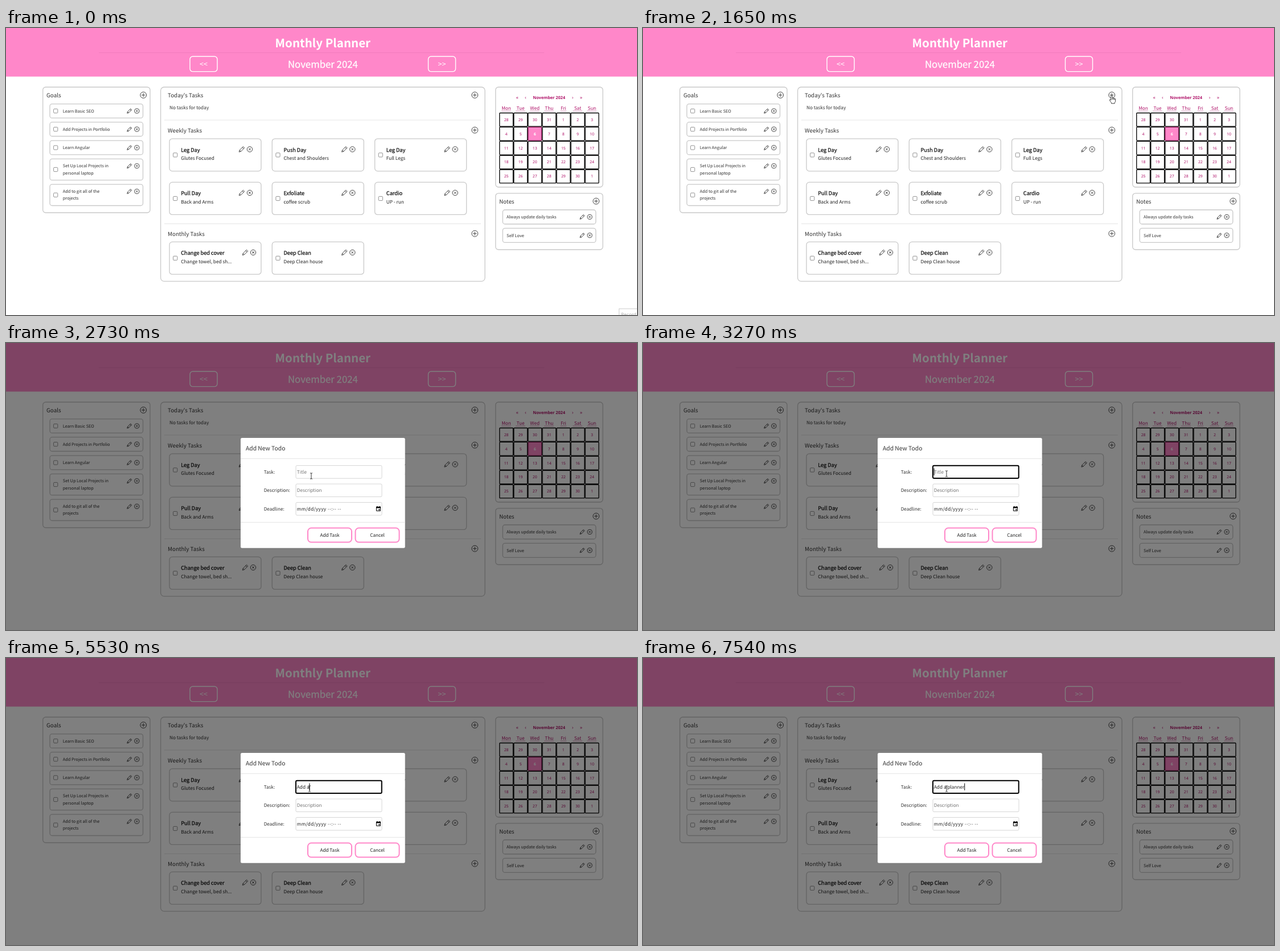
Recreate the animation shown at these times as an HTML page. Size 1108x505 px, loop 8000 ms.

```html
<!DOCTYPE html>
<html lang="en">
<head>
<meta charset="utf-8">
<title>Monthly Planner</title>
<style>
  html, body { margin: 0; width: 100%; height: 100%; overflow: hidden; background: #fff; }
  svg { display: block; width: 1108px; height: 505px; }
  text { font-family: "Noto Sans CJK JP", "Noto Sans CJK SC", "Noto Sans", sans-serif; white-space: pre; text-rendering: geometricPrecision; }
  .cal, .tip { font-family: "Noto Sans", sans-serif; }
</style>
</head>
<body>
<svg id="stage" viewBox="0 0 1108 505"></svg>
<script>
const PINK = '#ff87c9', PLUM = '#b0146a', GREY = '#c9c9c9', LOOP = 8000;

const text = (x, y, size, str, fill = '#333', more = '') =>
  `<text x="${x}" y="${y}" font-size="${size}" fill="${fill}" ${more}>${str}</text>`;
const mid = 'text-anchor="middle"';
const medium = (color, w) => `stroke="${color}" stroke-width="${w}"`;
const box = (x1, y1, x2, y2, r, stroke = GREY, w = 1.3, fill = '#fff') =>
  `<rect x="${x1}" y="${y1}" width="${x2 - x1}" height="${y2 - y1}" rx="${r}" fill="${fill}" stroke="${stroke}" stroke-width="${w}"/>`;
const line = (x1, x2, y, color = '#e5e5e5') =>
  `<path d="M${x1} ${y}H${x2}" stroke="${color}"/>`;
const icon = (x, y, scale, d) =>
  `<path transform="translate(${x} ${y}) scale(${scale})" d="${d}" fill="none" stroke="#333" stroke-width="${0.9 / scale}" stroke-linejoin="round"/>`;
const ring = 'M-5 0A5 5 0 1 1 5 0A5 5 0 1 1-5 0';
const plus = (x, y) => icon(x, y, 1.08, ring + 'M-3 0H3M0-3V3');
const cross = (x, y, s) => icon(x, y, s, ring + 'M-2-2L2 2M2-2L-2 2');
const pencil = (x, y, s) => icon(x, y, s, 'M-5 5L-4 1.6 2.6-5 5-2.6-1.6 4ZM1-3.4L3.4-1M-4 1.6L-1.6 4');
const check = (x, y) => box(x - 3.6, y - 3.6, x + 3.6, y + 3.6, 1.3, '#767676', 0.8);

function item(x, y, h, lines, checked) {
  const iconY = y + 12.4, tx = x + (checked ? 22.8 : 6.8);
  return box(x, y, x + 163.5, y + h, 4) +
    (checked ? check(x + 10.2, y + h / 2) : '') +
    lines.map((s, i) => text(tx, y + 15.1 + i * 12.2, 7.36, s)).join('') +
    pencil(x + 139.7, iconY, 0.8) + cross(x + 152.8, iconY, 0.82);
}

function card(col, y, title, note, shift = 0) {
  const x = 287 + col * 180.3;
  return box(x, y, x + 161, y + 57, 5) + check(x + 10.2, y + 28.6) +
    text(x + 20.2, y + 23, 9.2, title, '#111', medium('#111', 0.25)) +
    text(x + 20.2, y + 37.1, 8.28, note, '#222') +
    pencil(x + 127 + shift, y + 18.6, 0.95) + cross(x + 141 + shift, y + 18.6, 0.94);
}

function header() {
  const button = (x, s) => box(x, 50, x + 48, 76.6, 5, '#fff', 1.4, 'none') +
    text(x + 24, 67.8, 12.5, s, '#fff', mid);
  return `<rect width="1108" height="85.5" fill="${PINK}"/>` + line(163, 945, 43.5, '#f27cbd') +
    text(556.3, 34, 20.5, 'Monthly Planner', '#fff', mid + ' font-weight="700"') +
    text(556.4, 69.8, 16.8, 'November 2024', '#fff', mid + ' ' + medium('#fff', 0.25)) +
    button(323, '&lt;&lt;') + button(741.5, '>>');
}

function goals() {
  return box(64.7, 104, 253, 325, 5) + text(71, 121.9, 9.9, 'Goals') + plus(241.2, 118) +
    item(77, 133.6, 24.8, ['Learn Basic SEO'], true) +
    item(77, 165.7, 24.8, ['Add Projects in Portfolio'], true) +
    item(77, 198.1, 24.8, ['Learn Angular'], true) +
    item(77, 230.3, 37.4, ['Set Up Local Projects in', 'personal laptop'], true) +
    item(77, 275.1, 37.4, ['Add to git all of the', 'projects'], true);
}

function tasks() {
  const head = (y, s) => text(284, y, 9.8, s) + plus(823.2, y - 3.9);
  return box(271.6, 104, 841, 445.6, 6) +
    head(121.9, "Today's Tasks") + text(287, 142.8, 8.25, 'No tasks for today') + line(278, 834, 162) +
    head(183.6, 'Weekly Tasks') +
    card(0, 194.8, 'Leg Day', 'Glutes Focused') +
    card(1, 194.8, 'Push Day', 'Chest and Shoulders') +
    card(2, 194.8, 'Leg Day', 'Full Legs') +
    card(0, 271.4, 'Pull Day', 'Back and Arms') +
    card(1, 271.4, 'Exfoliate', 'coffee scrub') +
    card(2, 271.4, 'Cardio', 'UP - run') + line(278, 834, 344.5) +
    head(365.6, 'Monthly Tasks') +
    card(0, 376.4, 'Change bed cover', 'Change towel, bed sh...', 6) +
    card(1, 376.4, 'Deep Clean', 'Deep Clean house');
}

function calendar() {
  const cw = 25.07, ch = 24.95, x0 = 866, y0 = 148.8;
  let out = box(859.7, 104, 1048, 280, 5) +
    text(953.6, 125.2, 7.3, 'November 2024', PLUM, mid + ' class="cal" font-weight="700"');
  [[897.6, '«'], [912.2, '‹'], [995, '›'], [1010, '»']].forEach(([x, s]) =>
    out += text(x, 125, 8.4, s, PLUM, mid + ' class="cal"'));
  ['Mon', 'Tue', 'Wed', 'Thu', 'Fri', 'Sat', 'Sun'].forEach((d, i) => {
    const x = x0 + cw * (i + 0.5), w = d === 'Fri' ? 5 : 8.3;
    out += text(x, 144.4, 8.2, d, PLUM, mid) +
      `<path d="M${x - w} 146H${x + w}" stroke="${PLUM}" stroke-width=".8" stroke-dasharray="1 .8"/>`;
  });
  for (let i = 0; i < 35; i++) {
    const x = x0 + i % 7 * cw, y = y0 + Math.floor(i / 7) * ch;
    const day = i < 4 ? 28 + i : (i - 4) % 30 + 1, today = i === 9;
    out += box(x + 0.7, y + 0.7, x + cw - 0.6, y + ch - 0.6, 1, today ? '#7d0f4c' : '#000', 1.3, today ? PINK : '#fff') +
      text(x + cw / 2, y + 14.8, 6.8, day, today ? '#fff' : PLUM, mid + ' class="cal"' + (today ? ' font-weight="700"' : ''));
  }
  return out;
}

function notes() {
  return box(859.7, 290.8, 1048, 390, 5) + text(866, 308.7, 9.8, 'Notes') + plus(1036.2, 304.7) +
    item(872.2, 320, 25, ['Always update daily tasks']) + item(872.2, 352.4, 25, ['Self Love']);
}

function modal() {
  const label = (y, s) => text(452.7, y, 8.2, s);
  const field = y => box(509, y, 660, y + 22.6, 2, '#d6d6d6', 1);
  const button = (x, s) => box(x, 325.6, x + 77, 350.6, 6, PINK, 2) + text(x + 38.5, 340.8, 8.2, s, '#222', mid);
  return '<rect width="1108" height="505" opacity=".5"/>' +
    '<rect x="412" y="167" width="288.7" height="193.7" rx="2.5" fill="#fff"/>' +
    text(421, 188.9, 10.3, 'Add New Todo') + line(412, 700.7, 203.5) + line(412, 700.7, 315.5) +
    label(229.8, 'Task:') + label(262, 'Description:') + label(294.6, 'Deadline:') +
    field(215.6) + field(248) + field(280.5) +
    '<rect id="focus" x="509" y="215.7" width="150.7" height="22.3" rx="2" fill="none" stroke="#000" stroke-width="2"/>' +
    text(510.8, 229.8, 8.25, '', '#222', 'id="entry"') +
    '<rect id="caret" y="220.5" width="1" height="12.3"/>' +
    text(510.8, 262, 8.2, 'Description', '#757575') +
    text(510.8, 294.8, 8.2, 'mm/dd/yyyy', '#222', 'letter-spacing=".3"') +
    text(565, 294.8, 8.2, '--:-- --', '#555', 'letter-spacing=".3"') +
    '<path d="M650.4 288.8h7v6.6h-7z" fill="none" stroke="#000"/><path d="M650 288h8v2.6h-8zM651.2 287h1.2v1.5h-1.2zM655.6 287h1.2v1.5h-1.2zM654.3 292.3h2v2h-2z"/>' +
    button(530, 'Add Task') + button(613.5, 'Cancel');
}

const pointers = {
  arrow: '<path d="M0 0V10.6L2.5 8.3 4.1 12 5.8 11.2 4.2 7.7H7.5Z" fill="#fff" stroke="#222" stroke-width=".8"/>',
  hand: '<path d="M-1.2 8V1.2Q0-.5 1.2 1.2V5.2Q2.6 4.3 3.2 5.6 4.6 5 5 6.3 6.6 5.9 6.6 7.6V10.6Q6.4 12.5 5.2 13.2V14.8H-.6V13.4Q-2.6 11.2-3.7 8.8-3.6 7.3-2.2 7.8L-1.2 9ZM1.2 5.2V8M3.2 5.6V8.2M5 6.3V8.6" fill="#fff" stroke="#111" stroke-width=".8"/>',
  beam: '<path d="M-2-5.2Q0-5.4 0-4.2Q0-5.4 2-5.2M0-4.2V4.2M-2 5.2Q0 5.4 0 4.2Q0 5.4 2 5.2" fill="none" stroke="#222" stroke-width=".9"/>'
};

const stage = document.getElementById('stage');
stage.innerHTML = header() + goals() + tasks() + calendar() + notes() +
  '<g id="tip">' + box(1076.5, 494, 1120, 520, 0, '#ccc', 1) + text(1080, 507.3, 8.2, 'Record', '#aaa', 'class="tip"') + '</g>' +
  `<g id="modal">${modal()}</g><g id="pointer">` +
  Object.entries(pointers).map(([k, v]) => `<g id="${k}">${v}</g>`).join('') + '</g>';

const el = id => document.getElementById(id);
const show = (id, on) => el(id).setAttribute('visibility', on ? 'inherit' : 'hidden');

// Bursts of pointer movement: start, end, number of steps
const bursts = [[70, 820, 11], [890, 1650, 10], [2380, 2730, 6], [2990, 3270, 5]];
// Pointer path: time, x, y
const path = [
  [70, 1085, 492], [370, 632, 330], [820, 868, 131], [974, 841, 117], [1060, 841, 117],
  [1230, 830, 113], [1480, 825, 126], [1650, 823, 118], [2310, 823, 118],
  [2730, 536, 234], [2920, 536, 234], [3270, 533, 230]
];
const typed = 'Add a planner';
const keyTimes = [4000, 4270, 4470, 4930, 5530, 5730, 6830, 6920, 7010, 7210, 7320, 7430, 7540];

function stepped(t) {
  let q = 0;
  for (const [start, end, n] of bursts) {
    if (t < start) break;
    const gap = (end - start) / (n - 1);
    q = start + Math.min(n - 1, Math.floor((t - start) / gap + 1e-6)) * gap;
  }
  return q;
}

function position(t) {
  const i = path.findIndex(p => p[0] >= t);
  if (i < 0) return path[path.length - 1].slice(1);
  if (i === 0) return path[0].slice(1);
  const [t0, x0, y0] = path[i - 1], [t1, x1, y1] = path[i], k = (t - t0) / (t1 - t0);
  return [x0 + (x1 - x0) * k, y0 + (y1 - y0) * k];
}

function draw(t) {
  const q = stepped(t), open = t >= 2110, focused = t >= 3200;
  show('tip', t < 145);
  show('modal', open);
  show('pointer', t >= 70);
  el('pointer').setAttribute('transform', `translate(${position(q)})`);
  const kind = q >= 2729 ? 'beam' : !open && q >= 1220 ? 'hand' : 'arrow';
  for (const k in pointers) show(k, k === kind);

  const count = keyTimes.filter(k => t >= k).length, entry = el('entry');
  entry.textContent = count ? typed.slice(0, count) : 'Title';
  entry.setAttribute('fill', count ? '#222' : '#757575');
  const blank = (t >= 3740 && t < 4000) || (t >= 6210 && t < 6740);
  show('focus', focused);
  show('caret', focused && !blank);
  el('caret').setAttribute('x', 510.7 + (count ? entry.getComputedTextLength() : 0));
}

function tick(now) {
  draw(now % LOOP);
  requestAnimationFrame(tick);
}
draw(0);
requestAnimationFrame(tick);
</script>
</body>
</html>
```
